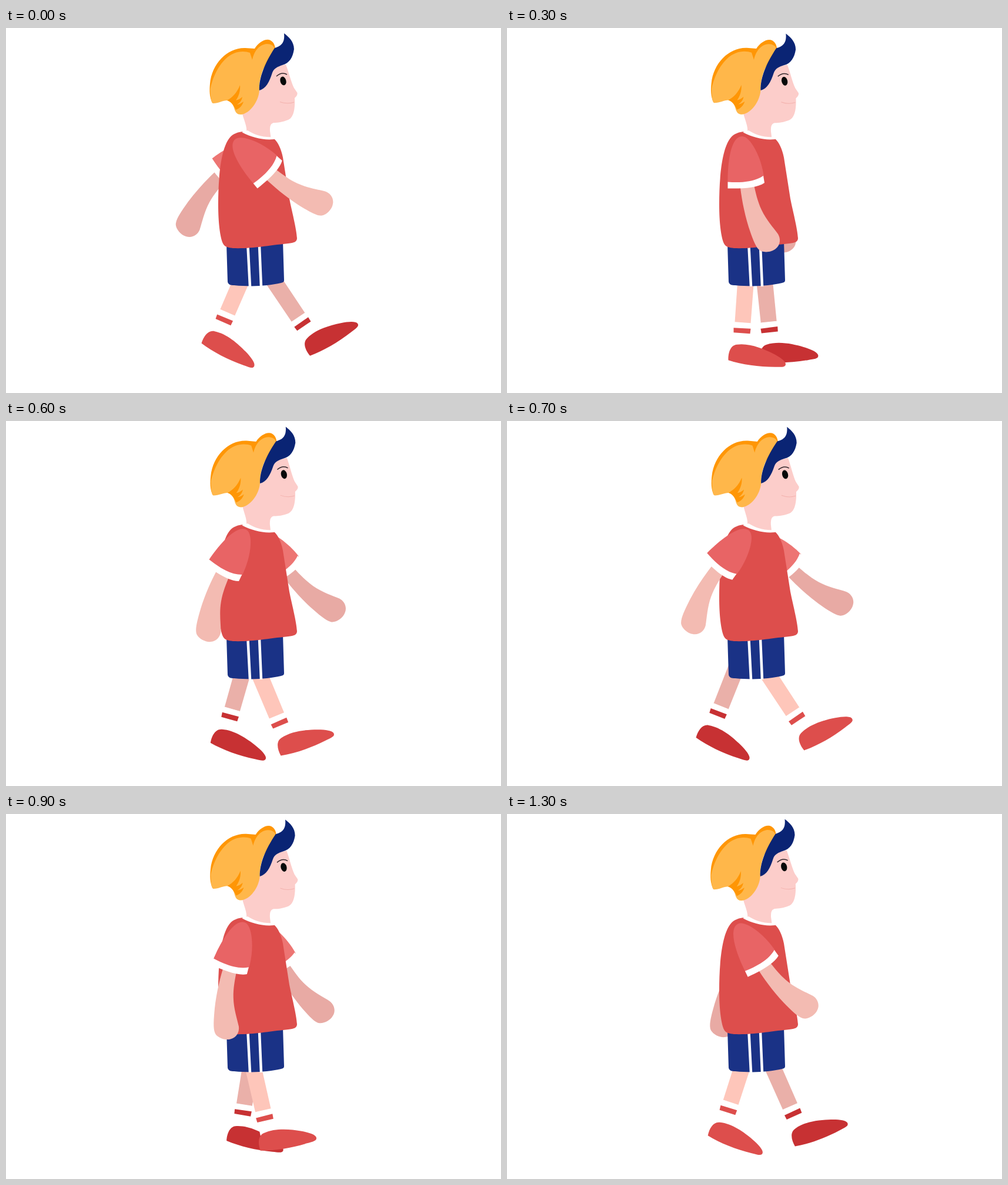
An HTML page that plays this animation: 842x620 px, repeating every 1.4 s.

```html
<!DOCTYPE html>
<html lang="en">
<head>
<meta charset="utf-8">
<title>Walking boy</title>
<style>
  html, body { margin: 0; width: 100%; height: 100%; overflow: hidden; background: #fff; }
  svg { display: block; width: 100vw; height: 100vh; }
</style>
</head>
<body>
<svg viewBox="0 0 842 620">
  <defs>
    <!-- Both limbs have their joint at the origin -->
    <g id="arm" transform="translate(-402 -199)">
      <path fill="var(--skin)" d="M396 262 C398 285 403 312 411 338 C417 356 422 370 428 376 C433 382 449 382 457 375 C465 369 466 358 461 350 C453 339 441 326 433 309 C426 294 423 280 419 262Z"/>
      <path fill="var(--cloth)" d="M400 184 C414 184 433 220 437 253 C420 263 395 263 375.5 262 C375 235 379 184 400 184Z"/>
      <path fill="#fff" d="M375.5 261.5 C397 263 420 262 436 251 L438 263 C425 272 400 273 375.5 272.5Z"/>
    </g>
    <g id="leg" transform="translate(-5 120)">
      <path fill="var(--skin)" d="M-6 -110 L22 -110 L14.5 -12 L-12.5 -14Z"/>
      <path fill="#fff" d="M-12.5 -14.5 L14.5 -12.5 L14 30 L-16 28Z"/>
      <path fill="var(--cloth)" d="M-14.5 -4.5 L14.5 -3 L13.5 5.5 L-14.5 3.5Z"/>
      <path fill="var(--cloth)" d="M-23.5 50.5 C-24 38 -20 25 -9 24 C12 21 36 31 52 39 C64 45 74 52 74 57 C74 63 67 62 56 62 C28 62 0 58 -23.5 50.5Z"/>
    </g>
  </defs>

  <use href="#arm" id="farArm" style="--skin:#e8aaa4;--cloth:#ed7573"/>
  <use href="#leg" id="farLeg" style="--skin:#eab0a9;--cloth:#c73133"/>
  <use href="#leg" id="nearLeg" style="--skin:#fec6ba;--cloth:#dd4e4c"/>

  <path fill="#1a3286" d="M375 366 L377 431 C378 436 382 437 388 437 C420 440 445 438 468 433 C472 432 473 431 473 428 L471 362Z"/>
  <path stroke="#fff" stroke-width="4.5" d="M411.5 372 L415 439 M431 370 L434 439"/>

  <g id="head">
    <path fill="#fccdca" d="M476 62 C481 75 485 92 490 102 L495.5 110 C496 114 494 116 491 119 C492 135 490 152 480 156 C470 160 462 161 455 161 C449 163 449 168 449 175 L451 190 L408 180 C412 172 406 160 402 146 L428 105 L453 66Z"/>
    <path fill="#ff9606" d="M351 127 C346 118 346 105 347 95 C350 60 377 33 407 34 L423 35 C430 24 442 17 450 21 C455 24 457 28 458 34 L420 100Z"/>
    <path fill="#ffb74a" d="M347.5 104 C350 92 356 70 373 53 C387 39 404 38 415 42 L419 54 C422 40 430 28 444 27 C450 27 456 30 457 35 C443 55 430 80 431 105 C430 125 415 145 400 147 C393 147 391 144 389 139 C387 131 384 126 377 123 C368 123 362 128 352 128 C349 127 348 118 347.5 104Z"/>
    <path fill="#ff9606" d="M398 97 C393 110 385 118 376 123 C383 125 387 131 391 139 C397 137 402 132 404 125 C400 128 396 130 393 130 C398 127 401 123 402 117 C399 120 395 122 391 123 C396 116 399 107 398 97Z"/>
    <path fill="#0a2474" d="M473 9 C481 15 490 23 490 36 C488 50 482 60 470 63 C462 66 456 68 453 76 C448 92 442 103 431 106 C430 85 440 60 457 34 C467 31 475 26 473 9Z"/>
    <ellipse cx="471.5" cy="90" rx="5" ry="7.5" transform="rotate(-15 471.5 90)" fill="#060909"/>
    <path fill="none" stroke="#33282d" stroke-width="1.5" d="M460 82 Q469 74 478 79"/>
    <path fill="none" stroke="#f3b2ae" d="M466 125.5 Q478 130 490 126"/>
  </g>

  <path fill="#dd4e4c" d="M402 176 C395 177 386 179 380 187 C366 205 361 250 361 300 C361 330 364 355 369 366 C372 372 378 373 386 374 C420 375 440 370 480 366 C490 365 495 363 495 357 C494 340 486 310 482 290 L471 220 C468 205 463 195 457 189 C438 189 418 184 402 176Z"/>
  <path fill="#fff" d="M401 177 L411 174 C424 182 437 186 454 185 L456 189 C438 191 418 186 401 177Z"/>

  <use href="#arm" id="nearArm" style="--skin:#f3bbb2;--cloth:#e86465"/>
</svg>
<script>
const STEP = 100, STEPS = 14, HALF = STEPS / 2, UPRIGHT = 3;

const setTransform = (id, value) => document.getElementById(id).setAttribute('transform', value);
const limb = (id, x, y, angle) => setTransform(id, `translate(${x} ${y}) rotate(${angle})`);

function draw(now) {
  const step = Math.floor(now / STEP) % STEPS;

  // s counts steps from the upright pose; the stride runs out and back.
  const s = HALF - Math.abs(HALF - step) - UPRIGHT;
  const q = s * s;
  limb('nearArm', 402 + 0.3 * s, 199, 12.4 * s - 0.28 * q);
  limb('farArm', 435 + 4 * s - 0.7 * q, 199 - 0.9 * s + 0.5 * q, 2 - 14 * s + 1.1 * q);
  limb('nearLeg', 405 + 1.2 * q, 393.8 + 3.26 * s, -7.7 * s - 0.42 * q);
  limb('farLeg', 430.6 - 4 * s - 0.9 * q, 393.5 - 3.2 * s + 0.2 * q, -10 + 8.3 * s - 0.35 * q);

  // The head nods forward for eight steps and back for six.
  const nod = (step + 1) % STEPS;
  const tilt = 1.4 * (nod < 8 ? nod / 8 : (STEPS - nod) / 6) - 0.2;
  setTransform('head', `rotate(${tilt} 430 165)`);
}

const start = performance.now();
function tick() {
  draw(performance.now() - start);
  requestAnimationFrame(tick);
}
tick();
</script>
</body>
</html>
```
